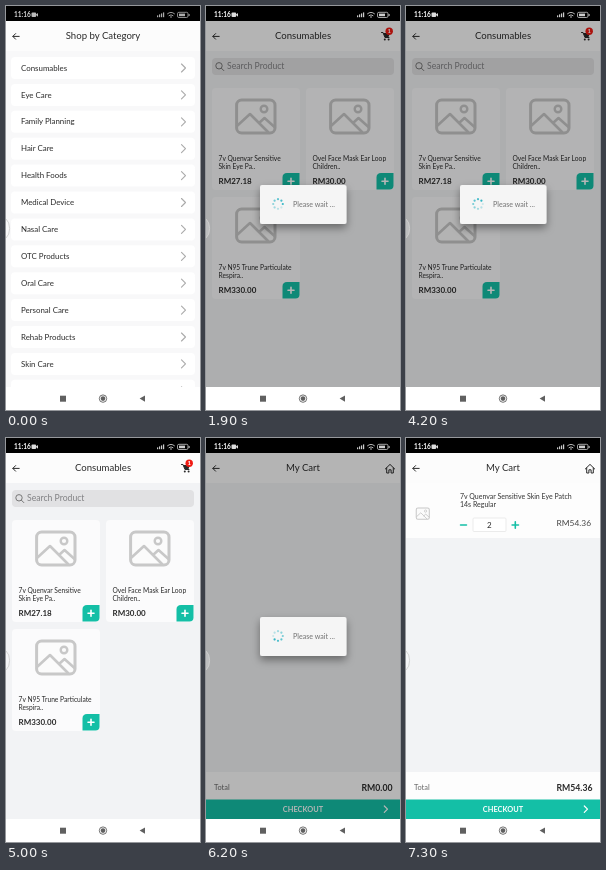
Write an HTML page that moves like this. It is 194 px wide and 404 px high and loops after 8000 ms.

```html
<!DOCTYPE html>
<html lang="en">
<head>
<meta charset="utf-8">
<title>Shop walkthrough</title>
<style>
  html, body { margin: 0; width: 100%; height: 100%; overflow: hidden; background: #fff; }
  svg { display: block; width: 194px; height: 404px; }
  text { font-family: Lato, "Open Sans", sans-serif; white-space: pre; }
</style>
</head>
<body>
<svg id="stage" viewBox="0 0 194 404"></svg>
<script>
const LOOP = 8000, TEAL = '#14bfa6', INK = '#2a2a2a', PAGE = '#f2f3f5';
const stage = document.getElementById('stage');

const rect = (x, y, w, h, fill, r = 0, more = '') =>
  `<rect x="${x}" y="${y}" width="${w}" height="${h}" rx="${r}" fill="${fill}" ${more}/>`;
const line = (d, color = INK, width = 1) =>
  `<path d="${d}" fill="none" stroke="${color}" stroke-width="${width}" stroke-linecap="round" stroke-linejoin="round"/>`;
const text = (x, y, size, str, { fill = INK, weight = 400, anchor = 'start', id = '' } = {}) =>
  `<text x="${x}" y="${y}" font-size="${size}" fill="${fill}" font-weight="${weight}" text-anchor="${anchor}" ${id && `id="${id}"`}>${str}</text>`;
const chevron = (x, y, color) => line(`M${x} ${y - 4}l4 4l-4 4`, color, 1.1);
const plus = (x, y, r, color) => line(`M${x - r} ${y}h${2 * r}M${x} ${y - r}v${2 * r}`, color, 1.6);

const header = title => rect(0, 15, 194, 30, '#fcfcfc') +
  line('M13.2 30.4H7M9.6 27.6l-2.8 2.8l2.8 2.8') +
  text(97, 33.1, 9.6, title, { anchor: 'middle' });

// Framed landscape: sun and two ridges in outline.
const picture = (x, y, scale) => `<g transform="translate(${x} ${y}) scale(${scale})">` +
  rect(1.6, 1.6, 38.4, 32.8, '#fbfbfb', 5, 'stroke="#c8c8c8" stroke-width="3"') +
  '<circle cx="29" cy="10.5" r="3.3" fill="none" stroke="#c8c8c8" stroke-width="2.4"/>' +
  line('M2.5 27l12.5-11.5l18 18M24 24.5l5.5-5l10 9', '#c8c8c8', 2.6) + '</g>';

function categoriesPage() {
  const names = ['Consumables', 'Eye Care', 'Family Planning', 'Hair Care', 'Health Foods', 'Medical Device',
    'Nasal Care', 'OTC Products', 'Oral Care', 'Personal Care', 'Rehab Products', 'Skin Care', ''];
  return rect(0, 15, 194, 366, '#f8f8f9') + header('Shop by Category') + names.map((name, i) => {
    const y = 62 + 26.9 * i;
    return rect(5, y - 11, 184, 22, '#fff', 4) + text(15, y + 2.6, 7.9, name) + chevron(175.5, y, '#aaa');
  }).join('');
}

const product = (x, y, first, second, price) => rect(x, y, 88, 102, '#fbfbfc', 4) +
  picture(x + 23, y + 10.5, 1) +
  text(x + 6.5, y + 73, 6.7, first) + text(x + 6.5, y + 81, 6.7, second) +
  text(x + 6.5, y + 96.3, 8, price, { weight: 700 }) +
  `<path d="M${x + 70.5} ${y + 101.5}v-12q0-4.5 4.5-4.5h12.5v12.5q0 4-4 4z" fill="${TEAL}"/>` +
  plus(x + 79, y + 93.3, 3, '#fff');

const productsPage = () => rect(0, 15, 194, 366, PAGE) + header('Consumables') +
  line('M175.5 26.5h1.5l2 5h4') +
  `<path d="M177.3 27h6.7l-1.6 4.2h-3.6z" fill="${INK}"/>` +
  `<circle cx="178.8" cy="33.4" r="1" fill="${INK}"/><circle cx="182.6" cy="33.4" r="1" fill="${INK}"/>` +
  '<circle cx="183.2" cy="25.3" r="3.7" fill="#f01c14"/>' +
  text(183.2, 27.4, 6, '1', { fill: '#fff', weight: 700, anchor: 'middle' }) +
  rect(6, 52, 182, 17, '#e1e1e3', 4) +
  '<circle cx="13" cy="59.8" r="3.2" fill="none" stroke="#777"/>' + line('M15.4 62.2l2.4 2.4', '#777') +
  text(21, 63.4, 8.65, 'Search Product', { fill: '#808083' }) +
  '<g id="goods">' +
  product(6, 82, '7v Quenvar Sensitive', 'Skin Eye Pa..', 'RM27.18') +
  product(100, 82, 'Ovel Face Mask Ear Loop', 'Children..', 'RM30.00') +
  product(6, 191, '7v N95 Trune Particulate', 'Respira..', 'RM330.00') + '</g>';

const cartPage = () => rect(0, 15, 194, 366, PAGE) + header('My Cart') +
  line('M179.3 31l4.7-4.6l4.7 4.6M180.7 30v5h2.2v-3.2h2.2v3.2h2.2v-5') +
  '<g id="item">' + rect(0, 45, 194, 55, '#fdfdfd') + picture(9.7, 69.5, 0.34) +
  text(54, 61, 7, '7v Quenvar Sensitive Skin Eye Patch', { fill: '#333' }) +
  text(54, 69.2, 7, '14s Regular', { fill: '#333' }) +
  line('M54.5 87h6', TEAL, 1.5) + plus(109.3, 87, 3.2, TEAL) +
  rect(67, 80, 33, 13.5, '#fff', 1, 'stroke="#e6e6e6" stroke-width=".8"') +
  text(83.3, 89.8, 8, '2', { anchor: 'middle' }) +
  text(185, 88, 8.4, 'RM54.36', { fill: '#444', anchor: 'end' }) + '</g>' +
  rect(0, 334, 194, 28, '#fdfdfd') + text(8, 352.4, 7.4, 'Total', { fill: '#666' }) +
  text(186.5, 352.6, 8.7, '', { weight: 700, anchor: 'end', id: 'total' }) +
  rect(0, 361.5, 194, 19.5, TEAL) +
  text(97, 374, 7.4, 'CHECKOUT', { fill: '#fff', weight: 700, anchor: 'middle' }) +
  line('M178.3 368l3.2 3.2l-3.2 3.2', '#fff', 1.2);

const dialog = () => `<g id="dialog">` + rect(54, 179, 86.5, 39, '#f5f5f5', 2, 'filter="url(#shadow)"') +
  '<g id="spinner">' + Array.from({ length: 8 }, (_, i) =>
    `<circle cx="72" cy="193.2" r="1.1" fill="#20afc0" opacity="${0.2 + 0.1 * i}" transform="rotate(${45 * i} 72 198)"/>`).join('') +
  '</g>' + text(87, 200.8, 7.1, 'Please wait ...', { fill: '#707070' }) + '</g>';

const statusBar = () => rect(0, 0, 194, 15, '#000') + '<g id="status">' +
  text(8, 11.2, 6.5, '11:16', { fill: '#fff', weight: 700 }) +
  rect(25.5, 6.6, 4.6, 4.4, '#ddd', 1) + '<path d="M30 8.5l2-1.6v3.8l-2-1.6z" fill="#ddd"/>' +
  [0, 1, 2, 3].map(i => rect(151 + 2 * i, 9.4 - i, 1.2, 1.8 + i, '#ccc')).join('') +
  line('M161.5 7.8q3.5-3 7 0M163 9.6q2-1.7 4 0', '#ccc', 0.9) + '<circle cx="165" cy="11" r=".8" fill="#ccc"/>' +
  rect(171.5, 6.3, 10.5, 5.2, 'none', 1.4, 'stroke="#ccc" stroke-width=".8"') +
  rect(173, 7.6, 6, 2.6, '#ccc') + rect(182.6, 8, 1, 2, '#ccc') + '</g>';

const navBar = () => rect(0, 381, 194, 23, '#fff') + rect(54, 389.7, 6, 6, '#606060') +
  '<circle cx="97" cy="392.6" r="3.7" fill="none" stroke="#606060" stroke-width=".9"/>' +
  '<circle cx="97" cy="392.6" r="2.3" fill="#606060"/>' +
  '<path d="M139 389.5v6.2l-5.4-3.1z" fill="#606060"/>';

stage.innerHTML = '<filter id="shadow" x="-30%" y="-50%" width="160%" height="220%">' +
  '<feDropShadow dx="0" dy="4" stdDeviation="4" flood-opacity=".4"/></filter>' +
  `<g>${categoriesPage()}</g><g id="products">${productsPage()}</g><g id="cart">${cartPage()}</g>` +
  rect(0, 15, 194, 366, '#000', 0, 'id="dim"') + dialog() +
  '<path d="M0 213q3.6 3 3.6 9.5t-3.6 9.5" fill="#fff" fill-opacity=".2" stroke="#d0d0d0" stroke-width=".9"/>' +
  navBar() + statusBar();

const part = id => document.getElementById(id);
const ramp = (t, start, length) => Math.min(1, Math.max(0, (t - start) / length));
const ease = p => 1 - (1 - p) ** 3;
const fade = (id, value) => part(id).setAttribute('opacity', value);

// Pages fade in while rising into place.
function enter(id, p) {
  fade(id, p);
  part(id).setAttribute('transform', `translate(0 ${40 * (1 - ease(p))})`);
}

// [start, fade-in length, end]
const waits = [[1500, 200, 2000], [3285, 200, 5000], [5900, 200, 6900]];

function draw(t) {
  fade('status', 0.85 + 0.15 * ramp(t, 400, 100));
  enter('products', ramp(t, 1270, 280));
  fade('goods', ramp(t, 1700, 150));
  enter('cart', ramp(t, 5570, 280));

  const shown = Math.max(...waits.map(([start, length, end]) =>
    ramp(t, start, length) * (1 - ramp(t, end - 60, 60))));
  fade('dim', 0.285 * shown);
  fade('dialog', shown);
  part('spinner').setAttribute('transform', `rotate(${Math.floor(t / 100) * 45} 72 198)`);

  const loaded = t >= 6850;
  fade('item', loaded ? 1 : 0);
  part('total').textContent = loaded ? 'RM54.36' : 'RM0.00';
}

(function tick() {
  draw(performance.now() % LOOP);
  requestAnimationFrame(tick);
})();
</script>
</body>
</html>
```
